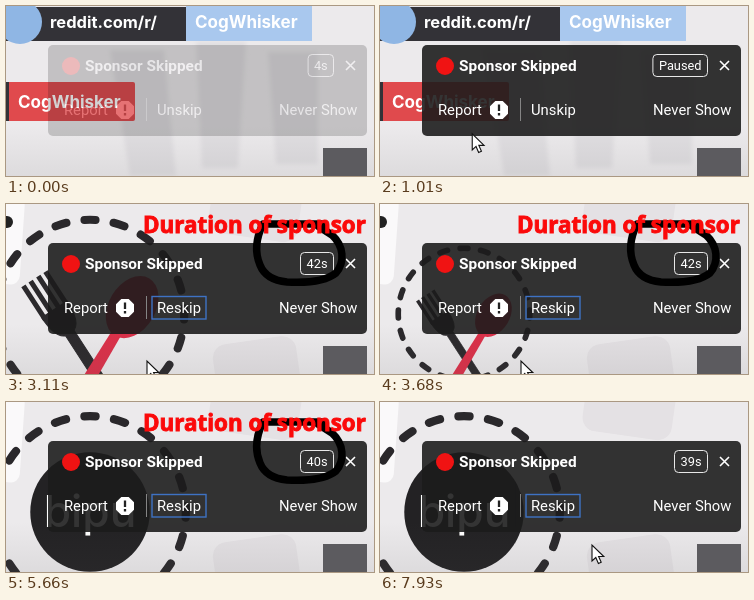
Write an HTML page that moves like this. It is 368 px wide and 170 px high and loops after 8000 ms.

```html
<!DOCTYPE html>
<html lang="en">
<head>
<meta charset="utf-8">
<title>Skip notice</title>
<style>
  html, body { margin: 0; width: 100%; height: 100%; overflow: hidden; }
  svg { display: block; width: 368px; height: 170px; font-family: Roboto, sans-serif; }
  .label { font: 700 17px Inter, sans-serif; fill: #fff; }
  .action { font-size: 14.8px; fill: #fff; }
</style>
</head>
<body>
<svg viewBox="0 0 368 170">
  <defs>
    <linearGradient id="shade" x1="0" y1="0" x2="0" y2="1">
      <stop offset="0" stop-color="#555" stop-opacity="0"/>
      <stop offset="1" stop-color="#555" stop-opacity=".1"/>
    </linearGradient>
    <filter id="soft"><feGaussianBlur stdDeviation="2"/></filter>
  </defs>
  <rect width="368" height="170" fill="#eceaec"/>

  <g id="links">
    <path d="M104 44h54l12 126h-46zM190 36h50l-8 126h-36zM262 46h50v112h-42z" fill="#e0dee1" filter="url(#soft)"/>
    <rect y="1" width="181" height="34" fill="#333237"/>
    <rect x="180" width="126" height="35" fill="#a9c8ee"/>
    <circle cx="14" cy="16" r="22" fill="#8fb6e4"/>
    <text class="label" x="44" y="22" style="font-size:16.5px">reddit.com/r/</text>
    <text class="label" x="189" y="22">CogWhisker</text>
    <rect y="76" width="129" height="39" rx="2" fill="#e04a4d"/>
    <rect y="76" width="3" height="39" fill="#333237"/>
    <text class="label" x="12" y="102">CogWhisker</text>
  </g>

  <g id="scene">
    <g fill="#e4e1e4">
      <rect x="205" y="-30" width="90" height="64" rx="14" transform="rotate(8 250 0)"/>
      <rect x="208" y="136" width="84" height="60" rx="14" transform="rotate(-8 250 160)"/>
    </g>
    <rect x="-50" y="-8" width="66" height="88" rx="9" fill="#faf9fa" transform="rotate(4 0 40)"/>
    <circle id="dot" cx="1" cy="18" r="6" fill="#222"/>
    <!-- 20 rounded dashes, one centred at the top -->
    <circle id="ring" r="93" pathLength="200" fill="none" stroke="#2a282b" stroke-width="8"
      stroke-linecap="round" stroke-dasharray="3.8 6.2" stroke-dashoffset="1.9"/>
    <g id="cutlery">
      <g transform="translate(4 36) rotate(-33)" fill="#2b292c" stroke="#2b292c">
        <path d="M-13-108v40M-4.5-108v40M4.5-108v40M13-108v40" stroke-width="5"/>
        <path d="M-15-72h30q0 24-10 28v150h-10v-150q-10-4-10-28z"/>
      </g>
      <g transform="translate(4 36) rotate(31)" fill="#dc3049">
        <ellipse cy="-73" rx="23" ry="33"/>
        <path d="M-5-46h10l3 150h-16z"/>
      </g>
    </g>
    <g id="badge">
      <circle r="58" fill="#232224"/>
      <text y="15" text-anchor="middle" fill="#fff" style="font:500 43px Inter,sans-serif">bipu</text>
    </g>
  </g>

  <rect y="120" width="368" height="50" fill="url(#shade)"/>
  <rect x="317" y="142" width="44" height="28" fill="#5c5b5f"/>

  <g id="notice">
    <rect x="42" y="39" width="319" height="91" rx="5" fill="#1c1b1c" fill-opacity=".89"/>
    <circle cx="65" cy="60" r="9" fill="#f01313"/>
    <text x="79" y="65" fill="#fff" font-size="15.4" font-weight="700">Sponsor Skipped</text>
    <rect id="timerBox" y="48.5" height="22" rx="4" fill="none" stroke="#e8e8e8"/>
    <text id="timer" y="64" text-anchor="middle" fill="#fff" font-size="12.8"></text>
    <path d="M340 55l9 9m0-9l-9 9" stroke="#fff" stroke-width="1.6"/>
    <text class="action" x="58" y="109">Report</text>
    <path d="M115.3 95h7.4l5.3 5.3v7.4l-5.3 5.3h-7.4l-5.3-5.3v-7.4z" fill="#fff"/>
    <path d="M119 98.5v6.5m0 2v2.5" stroke="#222" stroke-width="2.3"/>
    <path d="M140.5 92v23" stroke="#858585"/>
    <rect id="focus" x="146" y="92.5" width="54" height="22.5" fill="none" stroke="#3e72c4" stroke-width="1.4"/>
    <text id="toggle" class="action" x="151" y="109"></text>
    <text class="action" x="273" y="109">Never Show</text>
  </g>

  <g id="note">
    <path id="loop" pathLength="1" stroke-dasharray="1 2" fill="none" stroke="#000" stroke-width="7.5" stroke-linecap="round" stroke-linejoin="round"
      d="M318 20H257Q246 42 254 61Q260 76 281 78Q316 80 330 69C339 58 338 42 326 31L312 22"/>
    <text x="137" y="29" fill="#fb0a0a" stroke="#fb0a0a" stroke-width=".9" style="font:700 22.4px 'Open Sans',sans-serif">Duration of sponsor</text>
  </g>

  <path id="cursor" d="M0 0v16l3.8-3.5 2.6 6 2.8-1.2-2.6-5.8h5.2z" fill="#fff" stroke="#111" stroke-width="1.1"/>
</svg>
<script>
const LOOP = 8000;
const SEEK = 1720, HOVER = 930, LEAVE = 1870;
const el = id => document.getElementById(id);

const clamp = (v, low, high) => Math.min(high, Math.max(low, v));
const mix = (a, b, k) => a + (b - a) * k;
const ramp = (t, from, to) => clamp((t - from) / (to - from), 0, 1);
const smooth = (t, from, to) => { const k = ramp(t, from, to); return k * k * (3 - 2 * k); };
const place = (id, x, y, scale = 1) =>
  el(id).setAttribute("transform", `translate(${x} ${y}) scale(${scale})`);
const show = (id, on) => el(id).style.display = on ? "" : "none";

// The video runs only in two stretches; this is its own clock in ms.
const played = t => clamp(t - 2800, 0, 2630) + Math.max(0, t - 7610);

const pointerMoves = [
  { from: 770, to: 1010, x: 92, y: 128 },
  { from: 1010, to: 1320, x: 166, y: 103 },
  { from: SEEK, to: 2250, x: 141, y: 157 },
  { from: 5430, to: 5431, x: 358, y: 146 },
  { from: 5820, to: 6210, x: 236, y: 80 },
  { from: 7610, to: 7930, x: 212, y: 143 }
];

function drawPointer(t) {
  let x = 50, y = 168;
  for (const move of pointerMoves) {
    const k = ramp(t, move.from, move.to);
    x = mix(x, move.x, k);
    y = mix(y, move.y, k);
  }
  place("cursor", x, y);
  show("cursor", t >= 770 && (t < 5430 || t >= 5820));
}

function drawScene(p) {
  // The plate shrinks around the cutlery, then grows again with the badge.
  const size = mix(1.03, .67, smooth(p, 200, 1050) - smooth(p, 1050, 2100));
  const swap = smooth(p, 930, 1200);
  place("ring", 84, 110, size);
  place("cutlery", 84, 130, size * (1 - swap));
  place("badge", 84, 110, size * swap);
  el("dot").style.opacity = 1 - ramp(p, 900, 1500);
}

function drawTimer(t) {
  const text = t < HOVER ? "4s" : t < LEAVE ? "Paused" : 42 - Math.floor(played(t) / 975) + "s";
  const width = 11 + 7.2 * text.length + (text.length < 3 ? 0 : 0.4);
  el("timer").textContent = text;
  el("timer").setAttribute("x", 327.5 - width / 2);
  el("timerBox").setAttribute("x", 327.5 - width);
  el("timerBox").setAttribute("width", width);
}

function draw(t) {
  const unskipped = t >= SEEK;
  show("links", !unskipped);
  show("scene", unskipped);
  show("focus", t >= 1490);
  show("note", t >= LEAVE && t < 5900);
  el("toggle").textContent = unskipped ? "Reskip" : "Unskip";
  el("notice").style.opacity = mix(.22, 1, ramp(t, 80, 310));
  el("loop").setAttribute("stroke-dashoffset", 1 - ramp(t, 1810, 2100));
  drawScene(played(t));
  drawTimer(t);
  drawPointer(t);
}

function frame(now) {
  draw(now % LOOP);
  requestAnimationFrame(frame);
}
draw(0);
requestAnimationFrame(frame);
</script>
</body>
</html>
```
